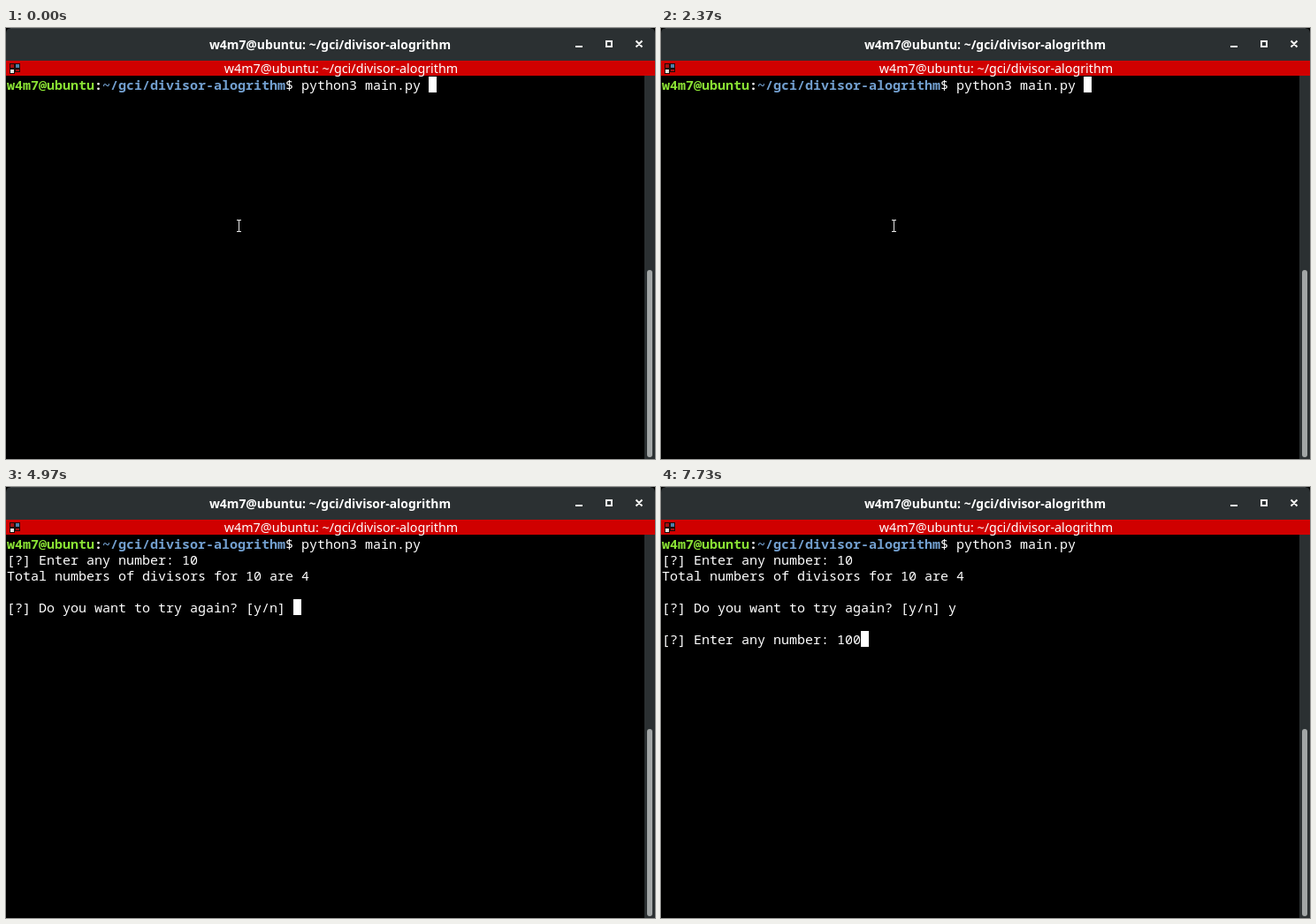
An HTML page that plays this animation: 734x488 px, repeating every 8 s.

```html
<!DOCTYPE html>
<html lang="en">
<head>
<meta charset="utf-8">
<title>Terminal</title>
<style>
  html, body { margin: 0; width: 100%; height: 100%; overflow: hidden; background: #000; }
  svg { display: block; }
  text { white-space: pre; fill: #fff; }
  .title { font: 14.3px "Noto Sans", "Open Sans", sans-serif; text-anchor: middle; }
  .mono { font: 15px "Noto Sans Mono", "DejaVu Sans Mono", monospace; }
  .bold { font-weight: 700; }
  .title.bold { font-size: 13.9px; }
  .user { fill: #8ae234; }
  .path { fill: #729fcf; }
  .line { fill: none; stroke: #f4f4f2; stroke-width: 2; }
</style>
</head>
<body>
<svg width="734" height="488" viewBox="0 0 734 488">
  <rect width="734" height="488"/>
  <path d="M0 37V6Q0 0 6 0H728Q734 0 734 6V37Z" fill="#2b3032"/>
  <path d="M5 .5H729" stroke="#3c4143"/>
  <text class="title bold" x="366.5" y="24">w4m7@ubuntu: ~/gci/divisor-alogrithm</text>
  <path class="line" d="M644 21H652M679 15H685V21H679ZM712.5 14.5L719.5 21.5M719.5 14.5L712.5 21.5"/>

  <rect y="37" width="734" height="17" fill="#d00000"/>
  <text class="title" x="379" y="51">w4m7@ubuntu: ~/gci/divisor-alogrithm</text>
  <g stroke="#1c0b08">
    <rect x="4.5" y="40.5" width="5" height="5" fill="#a81010"/>
    <rect x="10.5" y="40.5" width="5" height="5" fill="#4b7fa8"/>
    <rect x="4.5" y="46.5" width="5" height="5" fill="#e6e6e2"/>
    <rect x="10.5" y="46.5" width="5" height="3" fill="#a81010"/>
  </g>

  <rect x="722" y="54" width="12" height="434" fill="#2b3032"/>
  <rect x="725" y="274" width="6" height="212" rx="3" fill="#a2a6a6"/>

  <text class="mono" x="1" y="70"><tspan class="bold user">w4m7@ubuntu</tspan><tspan class="bold">:</tspan><tspan class="bold path">~/gci/divisor-alogrithm</tspan>$ python3 main.py</text>
  <g id="rows"></g>
  <rect id="caret" width="9" height="18" fill="#fff"/>
  <path id="mouse" d="M261 217.5H266M263.5 218V230M261 230.5H266" stroke="#e6e6e6" fill="none"/>
</svg>
<script>
const LOOP = 8000, BLINK = 600, CELL = 9, ROW = 18, TOP = 55;
const byId = id => document.getElementById(id);
const rowsBox = byId("rows"), caret = byId("caret"), mouse = byId("mouse");

const ask = "[?] Enter any number: ";
const again = "\nTotal numbers of divisors for 10 are 4\n\n[?] Do you want to try again? [y/n] ";

// Each step appends output or a keystroke and restarts the caret blink.
const steps = [
  [-30, ""],
  [2530, "\n" + ask],
  [3800, "1"],
  [3870, "0"],
  [4570, again],
  [5500, "y"],
  [6030, "\n\n" + ask],
  [6930, "1"],
  [7200, "0"],
  [7470, "0"]
];

const rows = Array.from({ length: 6 }, (_, i) => {
  const row = document.createElementNS("http://www.w3.org/2000/svg", "text");
  row.setAttribute("class", "mono");
  row.setAttribute("x", 1);
  row.setAttribute("y", TOP + 15 + ROW * (i + 1));
  return rowsBox.appendChild(row);
});

function draw(t) {
  const past = steps.filter(([at]) => at <= t);
  const lines = past.map(([, add]) => add).join("").split("\n");
  rows.forEach((row, i) => {
    const text = lines[i + 1] || "";
    if (row.textContent !== text) row.textContent = text;
  });

  const last = lines.length - 1;
  const column = last ? lines[last].length : 53;
  const idle = t - past[past.length - 1][0];
  caret.setAttribute("x", 1 + column * CELL);
  caret.setAttribute("y", TOP + last * ROW);
  caret.style.visibility = Math.floor(idle / BLINK) % 2 ? "hidden" : "visible";
  mouse.style.visibility = last ? "hidden" : "visible";
}

const start = performance.now();
function tick() {
  draw((performance.now() - start) % LOOP);
  requestAnimationFrame(tick);
}
tick();
</script>
</body>
</html>
```
